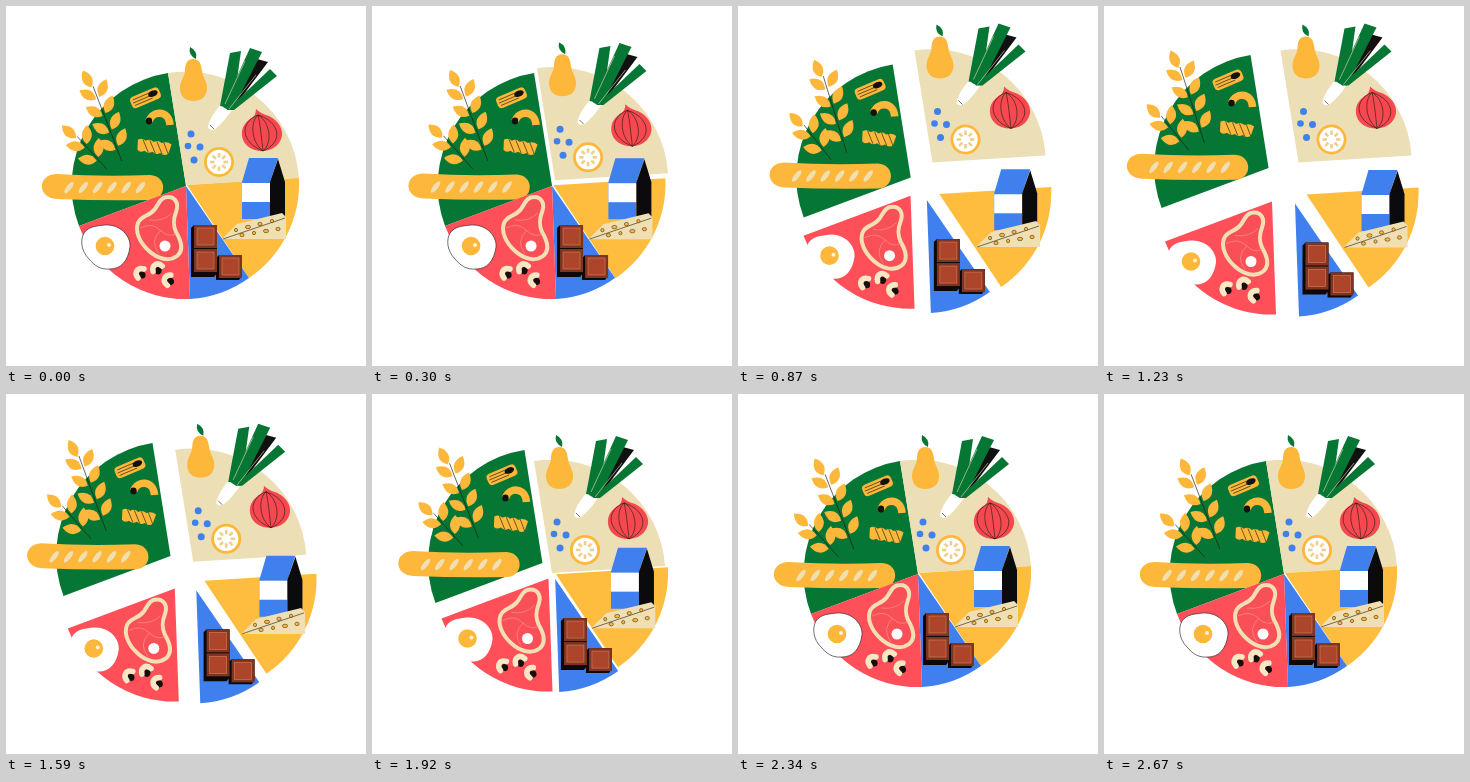
An HTML page that plays this animation: 360x360 px, repeating every 2.7 s.

```html
<!DOCTYPE html>
<html lang="en">
<head>
<meta charset="utf-8">
<style>
  html, body { margin: 0; width: 100%; height: 100%; overflow: hidden; background: #fff; }
  svg { display: block; width: 100vw; height: 100vh; }
  .gold { fill: #fdb73b; } .cream { fill: #f0dfb2; } .leaf { fill: #067634; } .blue { fill: #3f80ee; }
  .line { fill: none; stroke: #1d1a12; stroke-width: .6; }
</style>
</head>
<body>
<svg viewBox="0 0 360 360">
<g id="pie">
  <g id="grain">
    <path class="leaf" d="M180 180L73 220A114 114 0 0 1 162 67Z"/>
    <g id="wheat" class="gold"></g>
    <g transform="rotate(-23 139 92)">
      <rect class="gold" x="124" y="86" width="31" height="12" rx="4"/>
      <path class="line" d="M127 89H146M126 92H145M127 95H146"/>
      <ellipse cx="148" cy="91" rx="5" ry="3" fill="#111"/>
    </g>
    <path d="M143 115C147 104 163 104 164 119" fill="none" stroke="#fdb73b" stroke-width="7.5"/>
    <ellipse cx="143" cy="115" rx="3.2" ry="3.4" fill="#111"/>
    <g transform="rotate(8 148 141)">
      <path class="gold" d="M131 136q4-3 8 0q4-3 8 0q4-3 8 0q5-3 10 0l-2 10q-4 3-8 0q-4 3-8 0q-4 3-8 0q-4 3-7 0z"/>
      <path class="line" d="M136 135l7 12m0-12l7 12m0-12l7 12m0-12l6 11"/>
    </g>
    <g id="bread">
      <path class="gold" d="M50 168Q97 171 144 169C162 170 161 193 145 194Q97 195 51 193C31 192 31 169 50 168Z"/>
      <g id="cuts" class="cream"></g>
    </g>
  </g>
  <g id="produce">
    <path fill="#ecdfb5" d="M180 179L162 67A114 114 0 0 1 293 172Z"/>
    <path class="gold" d="M187 53C194 53 195 58 196 65C197 72 201 75 201 82C201 91 195 95 187 95C179 95 174 90 174 82C174 75 178 72 179 65C179 58 181 53 187 53Z"/>
    <path class="leaf" d="M190 53Q182 49 184 41Q192 45 190 53Z"/>
    <g id="leek">
      <path fill="#fff" d="M202 121Q203 112 216 97L226 104Q217 117 209 123Q203 125 202 121Z"/>
      <path fill="#111" d="M218 100L251 53L262 56L226 104Z"/>
      <path class="leaf" d="M214 100L224 47L235 45L229 88L224 102Z"/>
      <path class="leaf" d="M217 101L244 42L256 46L230 97L222 104Z"/>
      <path class="leaf" d="M221 104L264 63L271 70L228 104Z"/>
      <path d="M219 98L239 55M223 103L250 69" stroke="#ecdfb5" stroke-width=".6"/>
      <path class="line" d="M204 119l4 4"/>
    </g>
    <g id="onion">
      <path fill="#f64850" d="M250 103Q255 108 263 110C273 115 277 123 276 130C274 140 265 145 256 145C246 145 237 139 236 130C235 121 240 115 247 111Q250 108 250 103Z"/>
      <g id="layers" class="line"></g>
    </g>
    <g class="blue">
      <circle cx="185" cy="128" r="3.5"/><circle cx="194" cy="141" r="3.5"/>
      <circle cx="182" cy="140" r="3.3"/><circle cx="188" cy="154" r="3.5"/>
    </g>
    <circle class="gold" cx="213" cy="156" r="15"/>
    <circle cx="213" cy="156" r="12.2" fill="#fff"/>
    <g id="segments" stroke="#efcf8c" stroke-width="2.6"></g>
  </g>
  <g id="dairy">
    <path fill="#ffbd40" d="M181 179L293 172A114 114 0 0 1 243 272Z"/>
    <g id="milk">
      <path class="blue" d="M236 176L243 152H272L264 176V213H236Z"/>
      <path fill="#fff" d="M236 177H264V196H236Z"/>
      <path fill="#0b0b0d" d="M272 153L279 176V213H264V176Z"/>
    </g>
    <g id="cheese">
      <path class="cream" d="M216 233L231 218L276 207L280 211V233Z"/>
      <path class="line" d="M217 233L279 212"/>
      <g id="holes" class="gold" stroke="#4b3512" stroke-width=".6"></g>
    </g>
  </g>
  <g id="sweets">
    <path class="blue" d="M180 180L243 272A114 114 0 0 1 184 293Z"/>
    <g id="chocolate">
      <path fill="#0e0806" d="M185 222L188 219H211V267L208 271H185ZM210 252L213 249H236V270L233 274H210Z"/>
      <g id="squares"></g>
    </g>
  </g>
  <g id="protein">
    <path fill="#ff4f59" d="M180 180L184 293A114 114 0 0 1 73 220Z"/>
    <path id="egg" fill="#fff" stroke="#333" stroke-width=".7" d="M99 219C114 218 125 230 124 241C122 255 115 263 104 263C94 264 88 259 83 253C75 245 74 234 78 227C83 220 91 220 99 219Z"/>
    <circle class="gold" cx="99" cy="240" r="9.3"/><circle cx="103" cy="239" r="2" fill="#fff4d5"/>
    <path d="M162 191C170 191 173 198 170 206C167 214 167 219 170 226C176 236 177 245 171 250C163 256 152 253 143 245C133 236 129 225 132 217C135 209 143 211 149 203C153 197 155 191 162 191Z" fill="#f94f57" stroke="#f2dfb4" stroke-width="4"/>
    <path d="M134 222Q146 216 154 224T170 228M143 214Q157 216 166 207M155 224Q143 235 153 248" fill="none" stroke="#fb8a82" stroke-width=".8"/>
    <circle cx="159" cy="240" r="5.5" fill="#fff"/>
    <g id="beans"></g>
  </g>
</g>
</svg>
<script>
  const LOOP = 2700, OPENING = 750, CLOSING = 700;
  const el = id => document.getElementById(id);
  const repeat = (n, draw) => Array.from({ length: n }, (_, i) => draw(i)).join('');

  const leaf = (x, y, tilt) =>
    `<path transform="translate(${x} ${y}) rotate(${tilt})" d="M0-9.5Q10 1 0 9.5Q-10 1 0-9.5Z"/>`;
  const ear = (x, y, tilt, pairs) => `<g transform="translate(${x} ${y}) rotate(${tilt})">
    <path class="line" d="M0 10V${pairs * 18 + 18}"/>${leaf(-3, 1, -6)}
    ${repeat(pairs, i => leaf(8.5, 15 + i * 17.5, 43) + leaf(-8, 16 + i * 18, -41))}</g>`;
  const square = (x, y) =>
    `<rect x="${x}" y="${y}" width="23" height="23" fill="#7e3423"/>
     <rect x="${x + 3}" y="${y + 3}" width="17" height="17" fill="#ac4529" stroke="#cf7957" stroke-width=".7"/>`;
  const bean = (x, y, tilt) => `<g transform="translate(${x} ${y}) rotate(${tilt})">
    <circle cx="2" cy="2" r="3.6" fill="#170d0b"/>
    <path d="M4-4C-3-6-6 0-2 5" fill="none" stroke="#f6e8c5" stroke-width="5.5" stroke-linecap="round"/></g>`;

  el('wheat').innerHTML = ear(83.5, 71, -21, 4) + ear(64.5, 123, -42, 2);
  el('squares').innerHTML = square(188, 219) + square(188, 243) + square(213, 249);
  el('beans').innerHTML = bean(134, 267, 0) + bean(151, 262, 25) + bean(162, 274, -15);
  el('cuts').innerHTML = repeat(6, i =>
    `<ellipse rx="2.5" ry="7" transform="translate(${63 + i * 14.3} 181.5) rotate(38)"/>`);
  el('segments').innerHTML = repeat(8, i => `<path d="M213 151.5V147" transform="rotate(${i * 45} 213 156)"/>`);
  el('layers').innerHTML = repeat(5, i =>
    `<path d="M252 109C${234 + i * 10} 116 ${234 + i * 11} 136 257 145"/>`);
  el('holes').innerHTML = repeat(8, i =>
    `<ellipse cx="${230 + i * 6}" cy="${i % 2 ? 230 - i : 224 - i * 1.5}" rx="${1.6 + i % 3 * .5}" ry="1.7"/>`);

  // Travel of each slice, and the middle of its opening and closing in ms
  const slices = [
    { id: 'produce', x: 14.5, y: -22.5, open: 450, close: 1590 },
    { id: 'dairy', x: 21.5, y: 9.5, open: 615, close: 1740 },
    { id: 'sweets', x: 11, y: 17.5, open: 715, close: 1825 },
    { id: 'protein', x: -12, y: 15.5, open: 812, close: 1825 },
    { id: 'grain', x: -15.5, y: -18, open: 885, close: 1973 }
  ];

  const ease = (t, middle, length) => {
    const k = Math.min(1, Math.max(0, (t - middle) / length + .5));
    return (1 - Math.cos(Math.PI * k)) / 2;
  };
  const move = (id, x, y) => el(id).setAttribute('transform', `translate(${x} ${y})`);

  function render(t) {
    const spread = {};
    for (const { id, x, y, open, close } of slices) {
      const p = spread[id] = ease(t, open, OPENING) - ease(t, close, CLOSING);
      move(id, x * p, y * p);
    }
    move('pie', 1.2 * Math.exp(-(((t - 540) / 130) ** 2)), 0);

    // Food drifts a little on its slice
    const sway = ease(t, 375, 350) - ease(t, 1425, 950);
    move('bread', 3 * sway, -3 * sway);
    el('wheat').setAttribute('transform', `rotate(${4 * sway} 115 158)`);
    move('leek', 2 * spread.produce, -2 * spread.produce);
    move('onion', 1.5 * spread.produce, 0);
    move('milk', 0, 2.5 * spread.dairy);
    move('cheese', 2 * spread.dairy, -spread.dairy);
    move('chocolate', 2.5 * spread.sweets, 0);
    el('egg').setAttribute('stroke-opacity', spread.protein < .12 ? 1 : 0);
  }

  function tick() {
    render(performance.now() % LOOP);
    requestAnimationFrame(tick);
  }
  tick();
</script>
</body>
</html>
```
